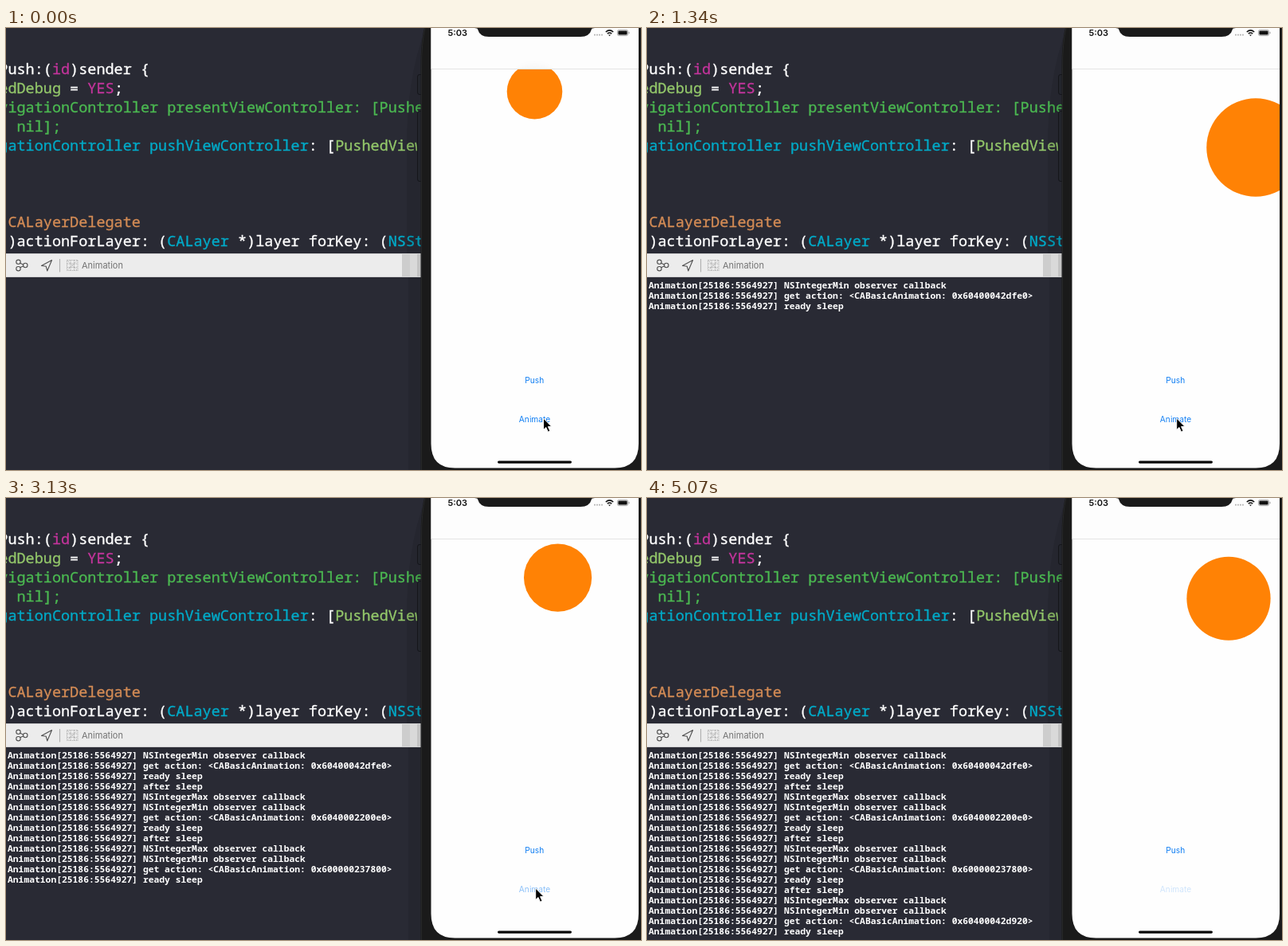
These frames come from a looping animation (797x555 px, 5.17 s). An HTML page:

```html
<!DOCTYPE html>
<html lang="en">
<head>
<meta charset="utf-8">
<title>Layer animation demo</title>
<style>
html, body { margin: 0; width: 100%; height: 100%; overflow: hidden; background: #292a34; }
svg { display: block; width: 797px; height: 555px; }
text { white-space: pre; }
.code { font: 500 18.5px "Noto Sans Mono", "DejaVu Sans Mono", monospace; color: #fff; }
.code tspan { fill: currentColor; stroke: currentColor; stroke-width: .35px; }
.log { font: 700 11.333px "Noto Sans Mono", "DejaVu Sans Mono", monospace; fill: #fff; }
.ui { font: 10.2px Inter, Roboto, sans-serif; fill: #107ef3; text-anchor: middle; }
.pink { color: #c2349b; }
.lime { color: #93c76a; }
.green { color: #4bb951; }
.cyan { color: #00aac8; }
.orange { color: #d38b55; }
</style>
</head>
<body>
<svg viewBox="0 0 797 555">
  <defs>
    <clipPath id="screen"><path id="glass" d="M533.5 0H794V522Q794 552.5 764 552.5H563.5Q533.5 552.5 533.5 522Z"/></clipPath>
    <clipPath id="nav"><path d="M534 0H794V51H534Z"/></clipPath>
    <filter id="soft" x="-30%" y="-30%" width="160%" height="160%"><feGaussianBlur stdDeviation="3"/></filter>
  </defs>
  <rect width="797" height="555" fill="#292a34"/>

  <g id="code" class="code"></g>
  <path d="M527 0Q503 60 503 150V283H505V555H540V0Z" fill="#000" opacity=".1"/>

  <rect y="283" width="521" height="29.5" fill="#ececec"/>
  <path d="M0 283.5H521M0 312.5H521" stroke="#cfcfd0"/>
  <path d="M497 284H507V312H497Z" fill="#cdcdcd"/>
  <path d="M507 284H516V312H507Z" fill="#d9d9d9"/>
  <path d="M516 284H521V312H516Z" fill="#c4c4c4"/>
  <g fill="none" stroke="#505050" stroke-width="1.1">
    <circle cx="15.5" cy="293.8" r="2.7"/><circle cx="15.5" cy="302.2" r="2.7"/><circle cx="24.3" cy="298" r="2.7"/>
    <path d="M17.8 295.3L21.9 297.2M17.8 300.7L21.9 298.8"/>
    <path d="M57.5 291.5L44.5 298.5L50.3 299.3L51.8 305Z" stroke-linejoin="round"/>
    <path d="M67.5 290V306.5" stroke="#b0b0b0"/>
    <path d="M76.5 291.5H90V304.5H76.5ZM81 291.5V304.5M85.5 291.5V304.5M76.5 296H90M76.5 300.5H90M76.5 291.5L90 304.5M90 291.5L76.5 304.5" stroke="#a9a9a9" stroke-width=".9" stroke-dasharray="1.3 1"/>
  </g>
  <text class="ui" x="95" y="302" style="font-size:11px;fill:#737373;text-anchor:start">Animation</text>

  <g id="log" class="log"></g>

  <path d="M521 58.5H519Q516.5 58.5 516.5 61V81Q516.5 83.5 519 83.5H521M521 104.5H519Q516.5 104.5 516.5 107V190Q516.5 192.5 519 192.5H521" fill="#23252c" stroke="#15161a"/>
  <path d="M525 0Q520.5 18 520.5 50V555H797V0Z" fill="#1a1a1a"/>
  <path d="M526 0Q521.5 18 521.5 50V555" fill="none" stroke="#262728"/>
  <use href="#glass" fill="#fefefe"/>

  <g clip-path="url(#screen)">
    <circle class="ball" fill="#ff8205"/>
    <path d="M533 0H794V51H533Z" fill="#fdfdfd"/>
    <g clip-path="url(#nav)"><circle class="ball" fill="#777" opacity=".035" filter="url(#soft)"/></g>
    <path d="M533 51.5H794" stroke="#e3e3e3"/>
  </g>

  <path d="M588 0Q591.5 0 592 1.5Q594.5 11 606 11H721Q732.5 11 735 1.5Q735.5 0 739 0Z" fill="#1a1a1a"/>
  <text class="ui" x="566.7" y="10" style="font-weight:600;font-size:11px;fill:#111">5:03</text>
  <path d="M738 8.7H749" stroke="#b5b5b5" stroke-width="1.8" stroke-dasharray="1.9 1.1"/>
  <g fill="none" stroke="#111" stroke-width="1.6">
    <path d="M752.8 5Q757.5 .9 762.2 5M754.8 7.2Q757.5 4.8 760.2 7.2"/>
    <path d="M757.5 10.2L756 8.6H759Z" fill="#111" stroke="none"/>
    <rect x="767.4" y="2.4" width="13.2" height="7.2" rx="2" stroke="#999" stroke-width=".8"/>
    <rect x="768.4" y="3.4" width="11.2" height="5.2" rx="1" fill="#111" stroke="none"/>
    <path d="M782 4.8V7.2" stroke="#999" stroke-width="1"/>
  </g>

  <text class="ui" x="663.3" y="446">Push</text>
  <text id="button" class="ui" x="663.5" y="494.5">Animate</text>
  <rect x="617" y="543.4" width="93" height="3.4" rx="1.7" fill="#080808"/>
  <path id="cursor" d="M0 0V14.6L3.3 11.5L5.8 17.2L8.4 16.1L5.9 10.6H10.4Z" fill="#000" stroke="#fff" stroke-width="1"/>
</svg>
<script>
const LOOP = 5170, TICK = 149, COL = 11.1;
const $ = id => document.getElementById(id);

// [row, column, [class, text]...]
const code = [
  [0, 0, ["", "Push:("], ["pink", "id"], ["", ")sender {"]],
  [1, 0, ["lime", "edDebug"], ["", " = "], ["pink", "YES"], ["", ";"]],
  [2, 0, ["green", "vigationController presentViewController: [Pushed"]],
  [3, 2, ["green", "nil];"]],
  [4, 0, ["cyan", "gationController pushViewController"], ["", ": ["], ["lime", "PushedView"]],
  [8, 1, ["orange", "CALayerDelegate"]],
  [9, 1, ["", ")actionForLayer: ("], ["cyan", "CALayer"], ["", " *)layer forKey: ("], ["cyan", "NSStri"]]
];
$("code").innerHTML = code.map(([row, col, ...parts]) =>
  `<text x="${col * COL - 8.7}" y="${58 + row * 24}">` +
  parts.map(([c, s]) => `<tspan class="${c}">${s}</tspan>`).join("") + "</text>").join("");

const messages = ["0x60400042dfe0", "0x6040002200e0", "0x600000237800", "0x60400042d920"].flatMap(a => [
  "NSIntegerMin observer callback", `get action: &lt;CABasicAnimation: ${a}&gt;`,
  "ready sleep", "after sleep", "NSIntegerMax observer callback"
]).slice(0, 18);
$("log").innerHTML = messages.map((m, i) =>
  `<text x="2" y="${327 + i * 13}">Animation[25186:5564927] ${m}</text>`).join("");
const logLines = [...$("log").children];
const balls = document.querySelectorAll(".ball");

// Each tap sends the ball to a new distance along its line.
const taps = [
  { time: 1018, to: 100.5 }, { time: 2061, to: 91.2 }, { time: 3043, to: -13.3 },
  { time: 4042, to: 66.5 }, { time: 5056, to: 66.5 }
];

const ramp = (t, from, to) => Math.min(1, Math.max(0, (t - from) / (to - from)));
const smooth = s => s * s * (3 - 2 * s);

// cubic-bezier(.25, .1, .25, 1), solved for its x by bisection
function ease(x) {
  const curve = (u, a, b) => 3 * u * (1 - u) * ((1 - u) * a + u * b) + u ** 3;
  let lo = 0, hi = 1;
  for (let i = 0; i < 20; i++) {
    const mid = (lo + hi) / 2;
    if (curve(mid, .25, .25) < x) lo = mid; else hi = mid;
  }
  return curve(lo, .1, 1);
}

function draw(t) {
  let travel = 0, glow = 1, lines = 0;
  taps.filter(tap => tap.time <= t).forEach(({ time, to }, i) => {
    travel += (to - travel) * ease(ramp(t, time, time + 250));
    glow = 1 - .85 * (1 - ramp(t, time, time + 400)) ** 2;
    if (t > time + 60) lines = 3 + 5 * i;
  });
  for (const ball of balls) {
    ball.setAttribute("cx", 663.5 + travel);
    ball.setAttribute("cy", 79.7 + travel * .7);
    ball.setAttribute("r", 34.8 + travel * .268);
  }
  $("button").setAttribute("opacity", glow);
  logLines.forEach((line, i) => line.setAttribute("visibility", i < lines ? "visible" : "hidden"));

  const drift = smooth(ramp(t, 150, 890)), leave = smooth(ramp(t, 4400, 4700));
  const x = 674.5 - 9.8 * drift + 90 * leave, y = Math.min(553, 490 + 73 * leave);
  $("cursor").setAttribute("transform", `translate(${x} ${y})`);
  $("cursor").setAttribute("visibility", t < 4900 ? "visible" : "hidden");
}

const start = performance.now();
function frame() {
  const t = (performance.now() - start) % LOOP;
  draw(Math.floor((t + 8) / TICK) * TICK);
  requestAnimationFrame(frame);
}
frame();
</script>
</body>
</html>
```
